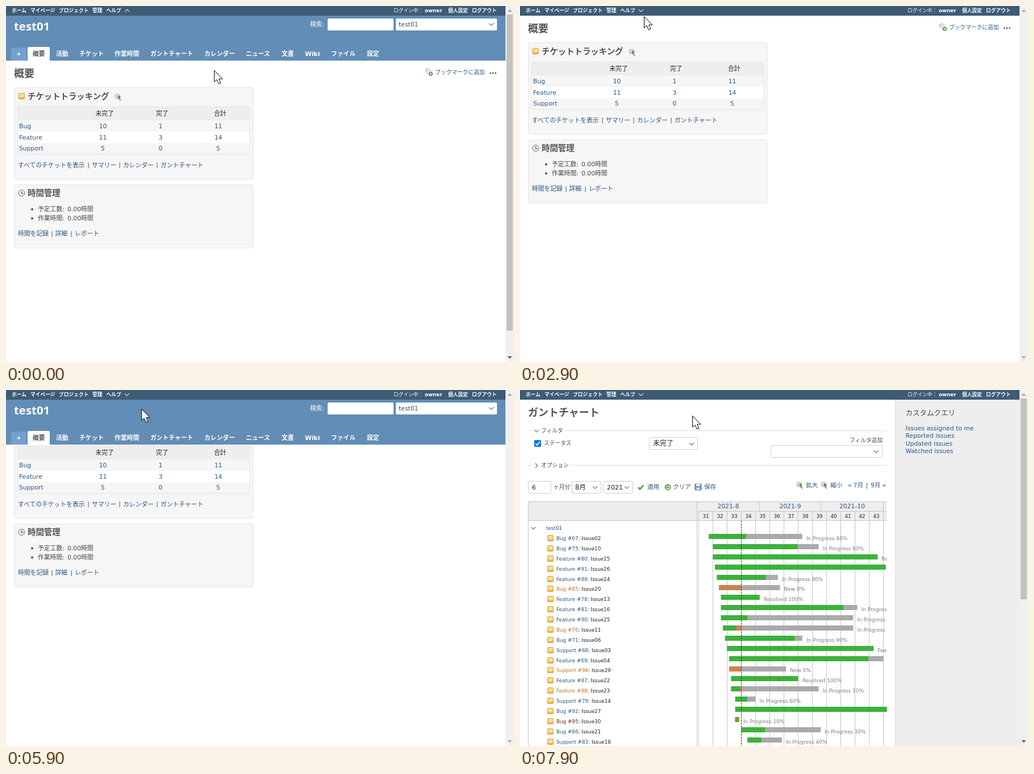
Animation, 894 px wide and 626 px high, one loop 8 s. Source, as an HTML page:

```html
<!DOCTYPE html>
<html lang="ja">
<head>
<meta charset="utf-8">
<style>
html, body { margin: 0; width: 100%; height: 100%; overflow: hidden; background: #fff; }
svg { display: block; }
text { font-family: 'DejaVu Sans', 'Noto Sans CJK JP', 'Noto Sans CJK', sans-serif; fill: #484848; white-space: pre; }
.b { font-weight: bold; }
.l { fill: #2a5685; }
.w { fill: #fff; }
.h { fill: #555; font-weight: bold; }
.d { fill: #222; }
.g { fill: #7c7c7c; }
.m { text-anchor: middle; }
.late { fill: #c8702a; }
.over { fill: #7a1d10; }
</style>
</head>
<body>
<svg id="stage" width="894" height="626" viewBox="0 0 894 626"></svg>
<script>
const LOOP = 8000, HIDE = 2500, REVEAL = 4150, GANTT = 7700;

const T = (x, y, s, cls = '', size = 10.8) =>
  `<text x="${x}" y="${y}" class="${cls}" font-size="${size}">${s}</text>`;
const R = (x, y, w, h, fill, stroke = 'none', r = 0) =>
  `<rect x="${x}" y="${y}" width="${w}" height="${h}" rx="${r}" fill="${fill}" stroke="${stroke}"/>`;
const P = (d, stroke, width = 1, fill = 'none') =>
  `<path d="${d}" stroke="${stroke}" stroke-width="${width}" fill="${fill}"/>`;
const C = (x, y, r, fill, stroke = 'none') =>
  `<circle cx="${x}" cy="${y}" r="${r}" fill="${fill}" stroke="${stroke}"/>`;
const G = (id, body, attrs = '') => `<g id="${id}" ${attrs}>${body}</g>`;
const chevron = (x, y, color = '#777', k = 1) =>
  P(`M${x - 4} ${y - 2 * k}L${x} ${y + 2 * k}L${x + 4} ${y - 2 * k}`, color, 1.2);
const row = (items, y, cls, size) => items.map(([x, s]) => T(x, y, s, cls, size)).join('');
const hline = (x1, x2, y) => P(`M${x1} ${y}H${x2}`, '#e0e0e0');

// Small icons
const ticket = (x, y) => R(x + .5, y + .5, 10, 10, '#f8da8c', '#cfa14c', 1) +
  R(x + 1, y + 7, 9, 3, '#eeb54e') + P(`M${x + 3} ${y + 5.5}l2 2l4 -4.5`, '#fbe9b8', 1.2);
const lens = (x, y, color) => C(x - 1, y - 1, 4, '#d5e0e6', '#9aa8ae') +
  P(`M${x + 1} ${y + 2}l4 4`, '#987850', 2) + C(x + 2, y, 2.5, color);
const field = (x, y, w, h) => R(x + .5, y + .5, w, h, '#fff', '#ccc', 2);

// Project page
const tabs = [[47, '概要'], [88, '活動'], [129, 'チケット'], [191, '作業時間'], [254, 'ガントチャート'],
  [349, 'カレンダー'], [422, 'ニュース'], [485, '文書'], [526, 'Wiki'], [572, 'ファイル'], [635, '設定']]
  .map(([x, s]) => ({ x: x - 9, w: (s === 'Wiki' ? 27 : s.length * 10.8) + 17.5, s }));

const box = (y, h) => R(14.5, y, 420.5, h, '#f6f6f6', '#e4e4e4', 3);
const bars = (xs, y) => xs.map(x => T(x, y, '|', 'm')).join('');
const counts = [['Bug', 10, 1, 11], ['Feature', 11, 3, 14], ['Support', 5, 0, 5]];

const overview =
  T(14, 125, '概要', 'h', 18) +
  P('M738.5 111l5 -1l7 8l-4 4l-8 -7z', '#9fb0bd', 1, '#dfe8ee') + C(747.5, 119.5, 3.5, '#5b9f4b') +
  P('M745.5 119.5h4M747.5 117.5v4', '#fff') +
  T(755, 120, 'ブックマークに追加', 'l', 9.72) +
  [852.5, 857, 861.5].map(x => C(x, 118, 1.4, '#555')).join('') +
  box(143.5, 161) + ticket(22, 153) + T(38, 163.5, 'チケットトラッキング', 'h', 14.4) + lens(197, 160, '#5ba045') +
  R(20.5, 177.5, 408.5, 83.5, '#f6f6f6', '#e4e4e4') + R(21, 178, 407.5, 23, '#eee') + R(21, 221, 407.5, 20, '#fff') +
  row([[157.5, '未完了'], [264, '完了'], [366, '合計']], 193, 'd') +
  counts.map(([name, ...n], i) => {
    const y = 215 + i * 19.7;
    return T(23, y, name, 'l') + n.map((v, k) => T(170.5 + k * 101.5, y, v, 'l m')).join('');
  }).join('') +
  row([[21, 'すべてのチケットを表示'], [151, 'サマリー'], [206, 'カレンダー'], [272, 'ガントチャート']], 283.5, 'l') +
  bars([145, 200, 266], 283) +
  box(314.5, 111) + C(27.5, 329, 5.6, '#dfe6ec', '#777') + P('M27.5 326v3.5h3', '#444') +
  T(38, 334, '時間管理', 'h', 14.4) +
  ['予定工数:', '作業時間:'].map((s, i) =>
    C(46, 357.5 + i * 16, 1.9, '#484848') + row([[56, s], [108, '0.00時間']], 361 + i * 16)).join('') +
  row([[21, '時間を記録'], [86.5, '詳細'], [121, 'レポート']], 404, 'l') + bars([81, 115], 404);

const header =
  R(0, 16, 879, 80, '#628db6') +
  `<text x="14" y="43" class="w b" style="font-family:'Open Sans',sans-serif" font-size="20.4">test01</text>` +
  T(535, 36, '検索:', 'w') + R(566, 22, 116, 21, '#fff', 'none', 2) + R(686, 22, 178, 21, '#fff', 'none', 2) +
  T(691, 36, 'test01') + chevron(854, 32.5) +
  R(9, 73, 27, 23, '#759fcf', 'none', 2) + T(22.5, 88, '+', 'w b m') +
  `<rect id="hover" y="72" height="24" rx="2" fill="#759fcf"/>` + R(38, 72, 39, 25, '#fff', 'none', 2) +
  tabs.map((t, i) => T(t.x + 9, 88, t.s, i ? 'w b' : 'h')).join('');

const topMenu =
  R(0, 0, 879, 17, '#3e5b76') +
  row([[10, 'ホーム'], [43, 'マイページ'], [93, 'プロジェクト'], [152, '管理'], [176.5, 'ヘルプ'],
    [737, 'owner'], [778, '個人設定'], [820, 'ログアウト']], 10.7, 'w b', 8.75) +
  T(682, 10.7, 'ログイン中：', 'w', 8.7) +
  G('up', chevron(213, 8, '#cdd6df', -1)) + G('down', chevron(213, 8, '#cdd6df'));

// Gantt page: kind, id, issue, first day, percent done, last day
const issues = `Bug 67 02 5 40 51|Bug 75 10 7 80 59|Feature 80 15 7 100 88|Feature 91 26 8 100 92
Feature 89 24 9 80 39|Bug 85 20 10 0 40|Feature 78 13 11 100 30|Feature 81 16 11 90 78
Feature 90 25 11 20 76|Bug 76 11 12 10 76|Bug 71 06 13 90 51|Support 68 03 14 100 86
Feature 69 04 15 90 91|Support 94 29 15 0 43|Feature 87 22 16 100 49|Feature 88 23 16 10 59
Support 79 14 18 60 28|Bug 92 27 18 100 95|Bug 95 30 18 10 20|Bug 86 21 21 30 60
Support 83 18 24 40 41`.split(/[|\n]/).map(s => s.split(' '));
const dayX = d => 314.3 + d * 3.58, TODAY = 389;

function issueRow([kind, id, no, first, pct, last], i) {
  const y = 260.5 + i * 17.88, x = dayX(+first), end = dayX(+last), top = Math.round(y - 7.4);
  const done = +pct && Math.max((end - x) * pct / 100, 4.5), now = Math.min(TODAY, end);
  const late = x + done < now;
  const state = pct === '0' ? 'New' : pct !== '100' ? 'In Progress' : kind === 'Support' ? 'Feedback' : 'Resolved';
  const cls = !late ? 'l' : end < TODAY ? 'over' : 'late';
  return ticket(48, Math.round(y - 5.5)) +
    T(64, y + 3.5, `<tspan class="${cls}">${kind} #${id}</tspan>: Issue${no}`, 'd', 8.8) +
    R(x, top, end - x, 9, '#aaa') + (late ? R(x, top, now - x, 9, '#c98350') : '') +
    R(x, top, done, 9, '#3bb23b') + T(end + 7, y + 3.5, `${state} ${pct}%`, 'g', 9);
}

let weeks = '';
for (let i = 0; i < 14; i++) {
  const x = 314.5 + i * 25;
  weeks += P(`M${x} 213V626`, '#c4c4c4') + T(x + 12.5, 224.5, 31 + i, 'd m', 8.8);
}
const chart =
  R(14.5, 196.5, 297, 33, '#eee', '#c4c4c4') + R(311.5, 196.5, 340, 33, '#eee', '#c4c4c4') +
  P('M311.5 213.5H646M421.5 196V213M529.5 196V213M639.5 196V213M311.5 229V626M14.5 229V626', '#c4c4c4') +
  ['8', '9', '10'].map((m, i) => T(366.5 + i * 109, 207.5, '2021-' + m, 'l m')).join('') + weeks +
  chevron(23.5, 243) + T(46, 246, 'test01', 'l', 8.8) + issues.map(issueRow).join('') +
  `<path d="M${TODAY + .5} 230V626" stroke="#701818" stroke-dasharray="3 2"/>`;

const gantt =
  R(0, 17, 879, 609, '#fff') + T(14, 46, 'ガントチャート', 'h', 18) +
  hline(14, 21, 71.5) + hline(80, 645, 71.5) + chevron(29, 72) + T(37, 74.5, 'フィルタ', '', 9.72) +
  R(25, 88, 12, 12, '#0b72e0', 'none', 2) + P('M27.5 94l2.5 3l5 -6', '#fff', 1.8) + T(42, 97, 'ステータス', '', 9.72) +
  field(227, 83, 85, 21) + T(234, 98, '未完了', 'd', 12) + chevron(302, 95) +
  T(580, 92, 'フィルタ追加', '', 9.72) + field(441, 97, 196, 21) + chevron(627, 108.5) +
  hline(14, 21, 132.5) + hline(90, 645, 132.5) + P('M27 129l4 4l-4 4', '#777', 1.2) + T(37, 136, 'オプション', '', 9.72) +
  field(14, 160, 40, 21) + T(21, 175, '6', 'd', 11) + T(59, 174, 'ヶ月分', '', 9.72) +
  field(91, 160, 51, 21) + T(97, 175, '8月', 'd', 11.5) + chevron(132, 171.5) +
  field(147, 160, 51, 21) + T(153, 175, '2021', 'd', 11) + chevron(188, 171.5) +
  P('M208 171l3 3.5l6 -7', '#4d9a3f', 2.6) +
  C(260, 171, 5.5, '#62a552') + P('M257 171a3 2.5 0 1 1 3 3h-4', '#e4f0df', 1.5) +
  R(308, 165, 11, 11, '#6d93c4', '#4f76a8', 1) + R(310, 165, 7, 4, '#eef3f8') + R(310.5, 171.5, 6, 4, '#dce5ef') +
  row([[224, '適用'], [269, 'クリア'], [324, '保存']], 174, 'l', 10.6) +
  row([[503, '拡大'], [546, '縮小'], [577, '« 7月'], [617, '9月 »']], 171, 'l', 10.6) +
  T(610.5, 171, '|', 'm') + lens(492, 167, '#5ba045') + lens(535, 167, '#c0564b') +
  G('chart', chart, 'clip-path="url(#clip)"') +
  R(660, 17, 219, 609, '#eee') + P('M660.5 17V626', '#ddd') +
  T(678.5, 45, 'カスタムクエリ', '', 12.5) +
  ['Issues assigned to me', 'Reported issues', 'Updated issues', 'Watched issues']
    .map((s, i) => T(678.5, 71 + i * 13.4, s, 'l')).join('');

const scrollbar = R(879, 0, 15, 626, '#f0f0f0') + `<rect id="thumb" x="881" y="15" width="11" fill="#c3c3be"/>` +
  P('M882.5 10l4 -4l4 4z', 'none', 0, '#a3a3a3') + `<path id="downArrow" d="M882.5 616l4 4l4 -4z"/>`;

const tip = (id, x, w, s) => G(id, R(x + .5, 17.5, w, 31, '#1c1c1c', '#ddd', 2) + T(x + 7.5, 37, s, 'w'));

const stage = document.getElementById('stage');
stage.innerHTML = '<clipPath id="clip"><rect x="14" y="196" width="631.5" height="430"/></clipPath>' +
  R(0, 0, 894, 626, '#fff') + G('overview', overview) + G('header', header) + G('gantt', gantt) +
  topMenu + scrollbar + tip('tipHide', 167, 101, 'ヘッダーを非表示') + tip('tipShow', 172.5, 91, 'ヘッダーを表示') +
  G('cursor',
    G('arrow', P('M.5 .5V20.5L5 16.5L8.5 24L12 22.5L8.7 15.2H15Z', '#000', 1, '#fff')) +
    G('hand', P('M-2 2Q0 -2 2 2V9Q4 7 5.5 9.5Q8 8 9 10.5Q12 10 12 13V19Q12 22 9.5 25V28H-2V26Q-6 21 -9 15Q-8 12 -5 14L-2 17Z', '#000', 1.2, '#fff') +
      P('M2 9v5M5.5 10v4M9 11v4', '#000')));

const el = {};
stage.querySelectorAll('[id]').forEach(e => el[e.id] = e);
const show = (id, on) => el[id].style.display = on ? '' : 'none';
const clamp = v => Math.max(0, Math.min(1, v));

// Pointer path: time, x, y
const path = [[0, 366, 113], [150, 366, 113], [1000, 213, 9], [1700, 213, 9], [2000, 213, 6], [2700, 213, 6],
  [3200, 228, 40], [3600, 227, 36], [4000, 222, 15], [4200, 214, 9], [4700, 214, 9], [5000, 224, 17],
  [5400, 224, 17], [6900, 277, 80], [7550, 277, 80], [7850, 303, 45], [LOOP, 303, 45]];

function pointer(t) {
  const i = path.findIndex(p => p[0] > t), [t0, x0, y0] = path[i - 1], [t1, x1, y1] = path[i];
  const u = (t - t0) / (t1 - t0), e = u * u * (3 - 2 * u);
  return [x0 + (x1 - x0) * e, y0 + (y1 - y0) * e];
}

function draw(t) {
  const [x, y] = pointer(t), isGantt = t >= GANTT;
  const hasHeader = t < HIDE || t >= REVEAL && !isGantt;
  const tab = hasHeader && y >= 72 && y < 96 && tabs.find(k => x >= k.x && x < k.x + k.w);
  const link = tab || x > 204 && x < 221 && y < 14;
  const thumb = t < HIDE ? 556 : isGantt ? 353 : 0;

  el.overview.setAttribute('transform', `translate(0 ${t < HIDE ? 0 : -79})`);
  show('header', hasHeader);
  show('gantt', isGantt);
  show('up', t < HIDE);
  show('down', t >= HIDE);
  show('hover', tab);
  if (tab) {
    el.hover.setAttribute('x', tab.x);
    el.hover.setAttribute('width', tab.w);
  }
  el.thumb.setAttribute('height', thumb);
  el.downArrow.setAttribute('fill', thumb ? '#505050' : '#a3a3a3');
  el.tipHide.style.opacity = t < HIDE ? clamp((t - 1600) / 300) : 0;
  el.tipShow.style.opacity = clamp((t - 4600) / 250) * clamp((5400 - t) / 200);
  el.cursor.setAttribute('transform', `translate(${Math.round(x)} ${Math.round(y)})`);
  show('hand', link);
  show('arrow', !link);
}

function frame() {
  draw(performance.now() % LOOP);
  requestAnimationFrame(frame);
}
frame();
</script>
</body>
</html>
```
